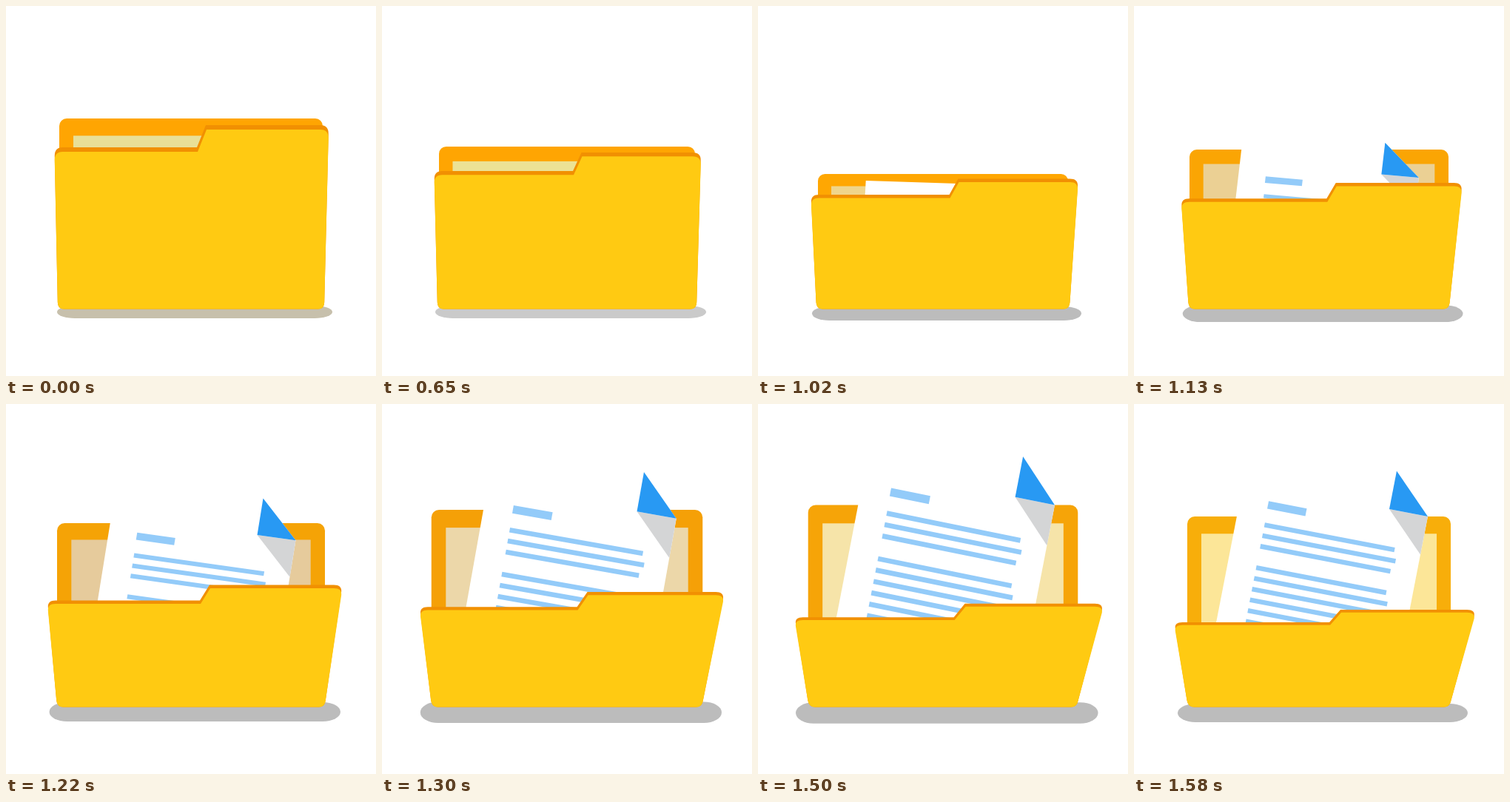
Recreate the animation shown at these times as an HTML page with a canvas. Size 500 by 500 pixels, loop 4.08 s.

```html
<!DOCTYPE html>
<html lang="en">
<head>
<meta charset="utf-8">
<title>Folder</title>
<style>
  html, body { margin: 0; width: 100%; height: 100%; overflow: hidden; background: #fff; }
  canvas { display: block; width: 100%; height: 100%; }
</style>
</head>
<body>
<canvas id="stage" width="500" height="500"></canvas>
<script>
const ctx = document.getElementById('stage').getContext('2d');
const LOOP = 4080, CX = 250, BASE = 409.5;

// back:   half width, top
// front:  left, right, half width at the base, low top, tab top, slope start, slope end, lip
// shadow: left, right, top, bottom
// page:   fold point, then the unit vectors along and down the sheet
// tint:   back panel, inner sheet, shadow
const closed = {
  back: [178, 152], front: [65.5, 436, 180, 191, 161, 258, 270, 6],
  shadow: [69, 441, 405, 422], tint: ['#ffa502', '#e9df97', '#c7c0ac']
};
const sink = {
  back: [173, 190], front: [70.5, 431, 175, 223, 198, 258, 269.5, 5.3],
  shadow: [72, 438, 405, 422], tint: ['#ffa502', '#ece295', '#cacaca']
};
const low = {
  back: [166, 241], front: [78, 423.5, 168, 267, 248, 257, 269, 3.9],
  shadow: [80, 430, 407, 423], tint: ['#fca803', '#eee494', '#feedbc']
};
const peek = {
  back: [169, 227], front: [71.5, 432.5, 171, 255, 233.5, 258.5, 270.5, 4.6],
  shadow: [73, 437, 406, 425], tint: ['#ffa702', '#efd58c', '#bcbcbc'],
  page: [329.2, 278, 49, 1.6, -2, 36]
};
const rise = {
  back: [181, 161], front: [56, 454, 181, 265.5, 244.5, 262, 275, 4.4],
  shadow: [58.5, 452, 403, 429], tint: ['#f5a306', '#e6cb9c', '#bcbcbc'],
  page: [339.5, 177, 52, 7.3, -8, 49.5]
};
const peak = {
  back: [185.5, 125], front: [46, 470, 184.5, 283, 263.5, 265, 280, 4],
  shadow: [45, 466, 402, 433], tint: ['#f49d07', '#f1e3b5', '#bcbcbc'],
  page: [349.5, 113.5, 54.5, 11.5, -11, 57]
};
const open = {
  back: [178, 152], front: [54.5, 461, 177, 295, 278, 264, 279, 3.8],
  shadow: [59, 451, 405, 430], tint: ['#f8ae0a', '#fce698', '#bcbcbc'],
  page: [345, 142, 52, 10, -10, 51.5]
};

function mixHex(a, b, k) {
  const part = (c, i) => parseInt(c.substr(1 + 2 * i, 2), 16);
  return 'rgb(' + [0, 1, 2].map(i => Math.round(part(a, i) + (part(b, i) - part(a, i)) * k)) + ')';
}

function mix(a, b, k) {
  const pose = {};
  for (const key in a) {
    pose[key] = a[key].map((v, i) =>
      key === 'tint' ? mixHex(v, b[key][i], k) : v + (b[key][i] - v) * k);
  }
  return pose;
}

// The motion is held on these poses
const steps = [
  [0, closed], [650, sink], [730, mix(sink, low, 0.5)], [840, low],
  [1020, peek], [1130, mix(peek, rise, 0.5)], [1220, rise],
  [1300, mix(rise, peak, 0.5)], [1380, peak], [1500, mix(peak, open, 0.43)], [1580, open]
];

function fillPoly(points, color) {
  ctx.beginPath();
  points.forEach(p => ctx.lineTo(p[0], p[1]));
  ctx.closePath();
  ctx.fillStyle = color;
  ctx.fill();
}

function drawShadow([x0, x1, y0, y1], color) {
  const ry = (y1 - y0) / 2, cy = y0 + ry, rx = 24, q = Math.PI / 2;
  ctx.beginPath();
  ctx.ellipse(x0 + rx, cy, rx, ry, 0, q, 3 * q);
  ctx.ellipse(x1 - rx, cy, rx, ry, 0, -q, q);
  ctx.closePath();
  ctx.fillStyle = color;
  ctx.fill();
}

function drawBack([w, top], tint) {
  const sx = w / 178, sy = (409 - top) / 257;
  ctx.beginPath();
  ctx.roundRect(CX - w, top, 2 * w, 400 - top, [10 * sx, 10 * sx, 0, 0]);
  ctx.fillStyle = tint[0];
  ctx.fill();
  const x = w - 19 * sx, y = top + 23.3 * sy;
  ctx.fillStyle = tint[1];
  ctx.fillRect(CX - x, y, 2 * x, 400 - y);
}

function drawPage([ox, oy, ux, uy, vx, vy]) {
  const at = (a, b) => [ox + a * ux + b * vx, oy + a * uy + b * vy];
  const bar = (a0, a1, b, h) =>
    fillPoly([at(a0, b), at(a1, b), at(a1, b + h), at(a0, b + h)], '#93cbf9');
  ctx.save();
  ctx.beginPath();
  ctx.rect(0, 0, 500, 400);
  ctx.clip();
  fillPoly([at(-3.785, -1), at(0, -1), at(1, 0), at(1, 4.6), at(-3.785, 4.6)], '#fff');
  fillPoly([at(0, 0), at(1, 0), at(1, 1)], '#d4d5d6');
  fillPoly([at(0, -1), at(1, 0), at(0, 0)], '#2899f3');
  bar(-3.06, -2.07, 0.385, 0.2);
  for (let i = 0; i < 10; i++) {
    if (i === 3) continue;
    bar(-3.05, i % 4 === 1 ? 0.41 : 0.33, 0.945 + 0.281 * i, 0.122);
  }
  ctx.restore();
}

function frontPath([l, r, half, yl, yr, s0, s1], lift, nudge, sy) {
  const rx = 11, ry = 4 + 8 * sy, lean = (CX - half - l) / (BASE - yl);
  const a = yl + lift, b = yr + lift, bl = CX - half, br = CX + half;
  ctx.beginPath();
  ctx.moveTo(l + lean * ry, a + ry);
  ctx.quadraticCurveTo(l, a, l + rx, a);
  ctx.lineTo(s0 + nudge, a);
  ctx.lineTo(s1 + nudge, b);
  ctx.lineTo(r - rx, b);
  ctx.quadraticCurveTo(r, b, r - lean * ry, b + ry);
  ctx.lineTo(br + lean * 9, BASE - 9);
  ctx.quadraticCurveTo(br, BASE, br - 8, BASE);
  ctx.lineTo(bl + 8, BASE);
  ctx.quadraticCurveTo(bl, BASE, bl - lean * 9, BASE - 9);
  ctx.closePath();
}

function drawFront(front) {
  const sy = (BASE - front[3]) / 218;
  frontPath(front, 0, 0, sy);
  ctx.fillStyle = '#f19002';
  ctx.fill();
  frontPath(front, front[7], 1, sy);
  ctx.fillStyle = '#ffca12';
  ctx.fill();
}

function draw(now) {
  const t = now % LOOP;
  const pose = steps.filter(s => s[0] <= t).pop()[1];
  ctx.fillStyle = '#fff';
  ctx.fillRect(0, 0, 500, 500);
  drawShadow(pose.shadow, pose.tint[2]);
  drawBack(pose.back, pose.tint);
  if (pose.page) drawPage(pose.page);
  drawFront(pose.front);
}

const start = performance.now();
function tick() {
  draw(performance.now() - start);
  requestAnimationFrame(tick);
}
tick();
</script>
</body>
</html>
```
